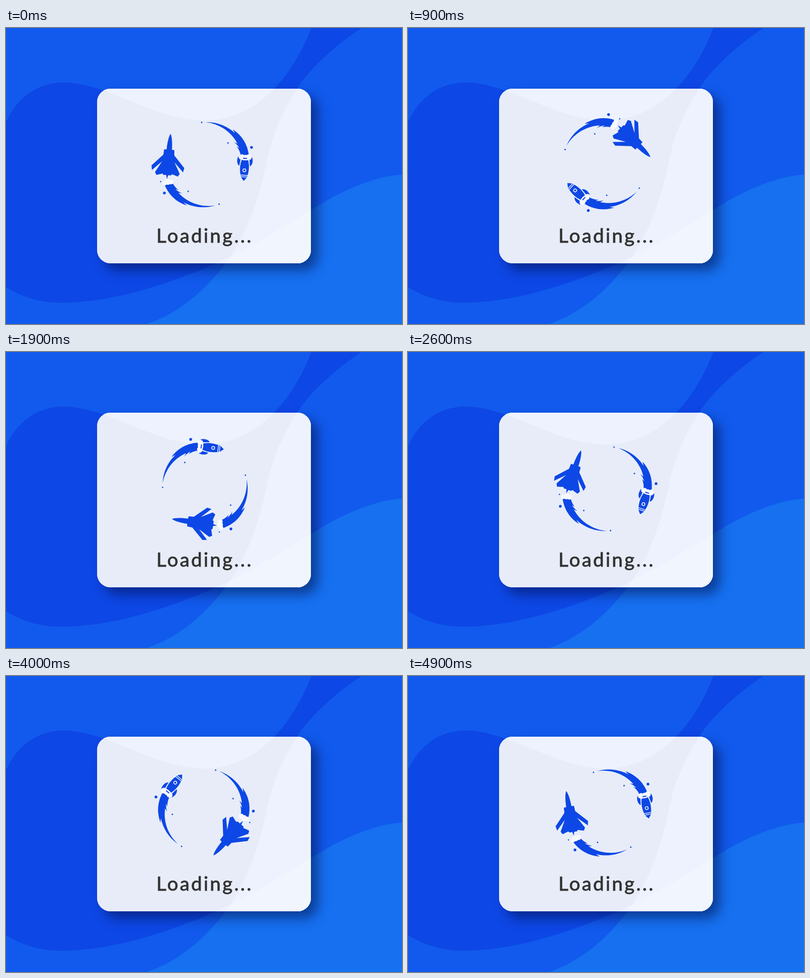
Recreate the animation shown at these times as an HTML page with a canvas. Size 800 by 600 pixels, loop 5000 ms.

```html
<!DOCTYPE html>
<html lang="en">
<head>
<meta charset="utf-8">
<title>Loading</title>
<style>
  html, body { margin: 0; width: 100%; height: 100%; overflow: hidden; }
  canvas, svg { position: absolute; left: 0; top: 0; display: block; }
  text {
    font: 39px Lato, sans-serif;
    letter-spacing: 3.4px;
    fill: #333;
    stroke: #333;
    stroke-width: 0.9px;
  }
</style>
</head>
<body>
<canvas id="stage" width="800" height="600"></canvas>
<svg width="800" height="600"><text x="303.8" y="434.6">Loading...</text></svg>
<script>
const ctx = document.getElementById('stage').getContext('2d');
const RAD = Math.PI / 180;
const CX = 400, CY = 275;
const STEP = 100;          // ms per pose
const TURN = 14.4;         // degrees per pose
const BLUE = '#0d47e5', PUFF = '#f7f9ff';

// Backdrop waves
const crest = new Path2D('M0 191C25 135 70 110 118 110.5C210 113 300 187 398 187.5C500 188 575 108 617 0H0Z');
const right = new Path2D('M718 0C655 42 610 88 588 123C545 190 533 240 525 280C507 360 485 420 443 478C400 535 345 580 285 600H800V0Z');
const low = new Path2D('M0 525C35 548 75 557 115 557C225 555 335 516 422 478C500 443 555 406 615 370C680 328 740 302 800 297V600H0Z');

const card = new Path2D();
card.roundRect(184, 123, 432, 354, 27);

// Rocket: window at the origin, nose towards +x
const hull = new Path2D('M-21-6.5C-14-8.7-4-10.6 10-7.2L14-6.3L21.7 0L14 6.3L10 7.2C-4 10.6-14 8.7-21 6.5Q-19.5 0-21-6.5Z');
const fin = new Path2D('M-8.5-10.8C-12-16-20-17-28-14C-24-13-22-11.5-21.5-9Z');

// Jet: nose at the origin, tail towards +y; one side, mirrored
const jetSide = [
  [5.4, 32], [10.4, 32.4], [11, 43], [33.2, 67], [31.5, 76], [12.5, 57],
  [25, 79.5], [21.8, 85.2], [9.5, 81.5], [8, 84], [2, 84], [0, 92]
];
const jet = new Path2D();
jet.moveTo(0, 0);
jet.bezierCurveTo(2.5, 4, 5, 14, 5.4, 32);
jetSide.forEach(([x, y]) => jet.lineTo(x, y));
jetSide.slice().reverse().forEach(([x, y]) => jet.lineTo(-x, y));
jet.bezierCurveTo(-5, 14, -2.5, 4, 0, 0);

// Trail in polar form: degrees clockwise from the top, distance from the centre
function trail(offset, lift, fall) {
  const path = new Path2D();
  let a0 = 2.7, r0 = 84;
  const to = (a, r, bulge = 0, n = 1) => {
    for (let i = 1; i <= n; i++) {
      const k = i / n;
      const ang = a0 + (a - a0) * k;
      const rad = r0 + (r - r0) * k + bulge * Math.sin(Math.PI * k);
      const d = rad + lift - fall * (ang - 2.7) / 77;
      const t = (ang + offset) * RAD;
      path.lineTo(CX + d * Math.sin(t), CY - d * Math.cos(t));
    }
    a0 = a; r0 = r;
  };
  to(2.7, 84);
  to(45.5, 88, 0.3, 16);
  to(40, 90.7);
  to(79, 92.2, 1.6, 16);
  to(81, 84);
  to(78, 76);
  to(62, 74.8, 0.6, 6);
  to(66, 78.2);
  to(54, 74.6, 0.4, 4);
  to(59, 78.8);
  to(2.7, 84, 0, 18);
  path.closePath();
  return path;
}
const rocketTrail = trail(0, 0, 0);
const jetTrail = trail(162.3, 3.7, 5.5);

function fill(path, color) {
  ctx.fillStyle = color;
  ctx.fill(path);
}

function dots(color, list) {
  ctx.fillStyle = color;
  for (const [x, y, r] of list) {
    ctx.beginPath();
    ctx.arc(x, y, r, 0, 2 * Math.PI);
    ctx.fill();
  }
}

function waves(dark, mid, light) {
  ctx.fillStyle = dark;
  ctx.fillRect(0, 0, 800, 600);
  for (const p of [crest, right, low]) fill(p, mid);
  ctx.save();
  ctx.clip(right);
  fill(low, light);
  ctx.restore();
}

function drawCard() {
  ctx.save();
  ctx.shadowColor = 'rgba(0, 10, 60, 0.5)';
  ctx.shadowBlur = 23;
  ctx.shadowOffsetX = 14;
  ctx.shadowOffsetY = 14;
  fill(card, '#e7ecf8');
  ctx.restore();
  ctx.save();
  ctx.clip(card);
  waves('#e7ecf8', '#edf2fe', '#f1f5fe');
  ctx.restore();
}

function line(x, half, color, width) {
  ctx.strokeStyle = color;
  ctx.lineWidth = width;
  ctx.beginPath();
  ctx.moveTo(x, -half);
  ctx.lineTo(x, half);
  ctx.stroke();
}

function drawRocket() {
  fill(rocketTrail, BLUE);
  dots(BLUE, [[496, 242, 2.8], [448.5, 233, 1.5], [395.3, 191.5, 1.4]]);
  const place = () => {
    ctx.save();
    ctx.translate(481.5, 288.5);
    ctx.rotate(93.5 * RAD);
  };
  place();
  fill(fin, BLUE);
  ctx.scale(1, -1);
  fill(fin, BLUE);
  ctx.restore();
  dots(PUFF, [[477, 261, 5], [484, 262, 5], [490.5, 261, 5], [484, 265, 4.5]]);
  place();
  ctx.strokeStyle = PUFF;
  ctx.lineWidth = 2;
  ctx.stroke(hull);
  fill(hull, BLUE);
  line(10, 8, PUFF, 1.4);
  line(13.2, 7.5, PUFF, 1.4);
  line(-24.3, 4, BLUE, 2);
  ctx.strokeStyle = PUFF;
  ctx.lineWidth = 1.5;
  ctx.beginPath();
  ctx.arc(0, 0, 3, 0, 2 * Math.PI);
  ctx.stroke();
  ctx.restore();
}

function drawJet() {
  fill(jetTrail, BLUE);
  dots(BLUE, [[320, 334.5, 2.8], [368, 331, 1.5], [430.5, 357, 1.5], [312.3, 311.6, 1.3]]);
  dots(PUFF, [[327, 312, 6], [320.8, 314.5, 4.5], [333.5, 312, 5]]);
  ctx.save();
  ctx.translate(332.5, 214.5);
  ctx.rotate(4.7 * RAD);
  fill(jet, BLUE);
  ctx.restore();
}

function render(now) {
  const pose = Math.floor((now % 5000) / STEP);
  waves(BLUE, '#115aed', '#1670f0');
  drawCard();
  ctx.save();
  ctx.translate(CX, CY);
  ctx.rotate(pose * TURN * RAD);
  ctx.translate(-CX, -CY);
  drawRocket();
  drawJet();
  ctx.restore();
  requestAnimationFrame(render);
}
requestAnimationFrame(render);
</script>
</body>
</html>
```
